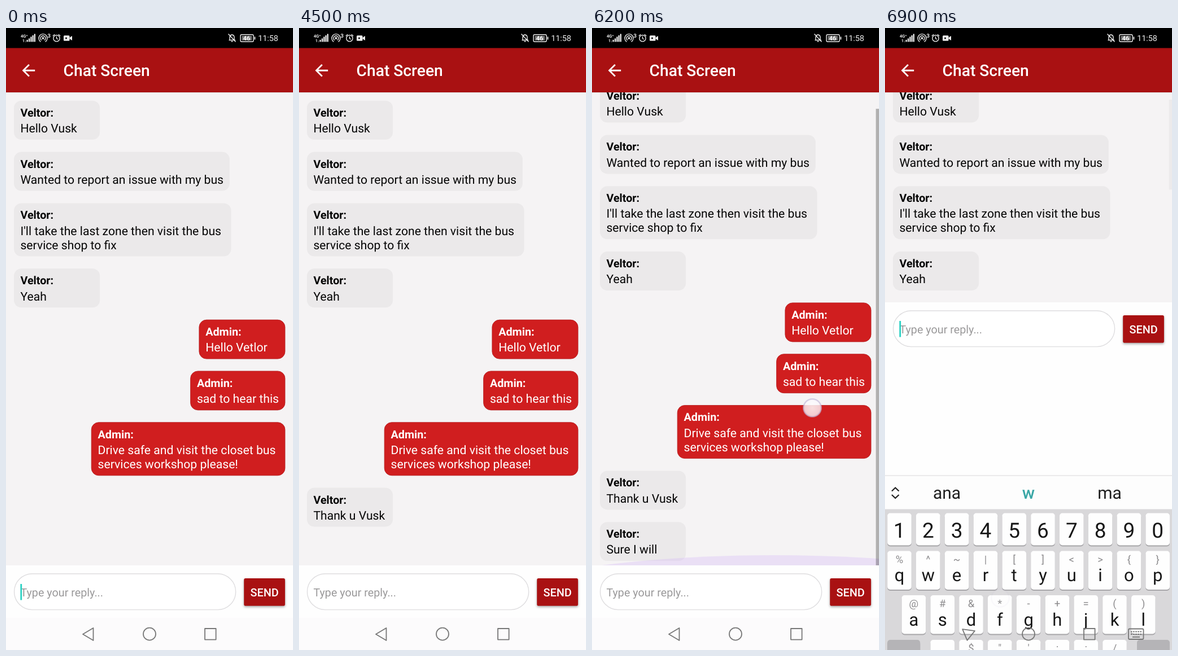
Write an HTML page that moves like this. It is 508 px wide and 1102 px high and loops after 7 s.

```html
<!DOCTYPE html>
<html lang="en">
<head>
<meta charset="utf-8">
<title>Chat</title>
<style>
html, body { margin: 0; width: 100%; height: 100%; overflow: hidden; background: #f5f3f4; }
svg { display: block; width: 100%; height: 100%; font-family: Roboto, "Noto Sans", sans-serif; text-rendering: geometricPrecision; }
</style>
</head>
<body>
<svg id="stage" viewBox="0 0 508 1102">
  <defs>
    <clipPath id="view"><rect id="viewRect" x="0" y="114" width="508" height="838"/></clipPath>
    <radialGradient id="dot">
      <stop offset="0" stop-color="#fff" stop-opacity=".85"/>
      <stop offset=".78" stop-color="#fbf8fc" stop-opacity=".8"/>
      <stop offset=".9" stop-color="#c3b8d8" stop-opacity=".85"/>
      <stop offset="1" stop-color="#c3b8d8" stop-opacity="0"/>
    </radialGradient>
  </defs>
  <rect width="508" height="1102" fill="#f5f3f4"/>

  <g clip-path="url(#view)">
    <g id="list"></g>
    <path id="glow" fill="#d2b0f5" fill-opacity=".3"/>
    <rect id="bar" x="502.5" width="5.5" fill="#000"/>
  </g>

  <g id="panel">
    <rect y="952" width="508" height="620" fill="#fefefe"/>
    <rect x="14.6" y="967" width="392" height="63.6" rx="31.8" fill="#fff" stroke="#dedddf" stroke-width="1.4"/>
    <text x="25.4" y="1006.7" font-size="19.76" fill="#9a999a">Type your reply...</text>
    <rect id="cursor" x="25.4" y="985" width="2.8" height="28.5" fill="#27d0c2"/>
    <rect x="421.2" y="975" width="72.7" height="48.7" rx="2.8" fill="#a91112" style="filter:drop-shadow(0 2px 2px rgba(0,0,0,.35))"/>
    <text x="457.6" y="1006.8" font-size="19.76" font-weight="500" fill="#fff" text-anchor="middle">SEND</text>
  </g>

  <rect id="navBack" y="1045" width="508" height="57" fill="#fcfbfc"/>
  <g id="keys"></g>

  <g fill="none" stroke="#777" stroke-width="1.8" stroke-linejoin="round">
    <path id="back" d="M136 1074L154.5 1063V1085Z"/>
    <circle cx="254" cy="1073.7" r="11"/>
    <rect x="352" y="1064" width="19.6" height="19.6"/>
    <g id="kbIcon">
      <rect x="431" y="1064.5" width="26.5" height="18.5" rx="2"/>
      <path d="M435 1069.5H454M435 1074H454" stroke-dasharray="2.6 1.5"/>
      <path d="M438 1079H451"/>
    </g>
  </g>

  <rect y="114" width="508" height="1.5" fill="#000" opacity=".06"/>
  <rect y="35" width="508" height="79" fill="#a91112"/>
  <path transform="translate(23 58.3) scale(1.411)" fill="#fff" d="M20 11H7.83l5.59-5.59L12 4l-8 8 8 8 1.41-1.41L7.83 13H20z"/>
  <text x="101.6" y="85.3" font-size="28.2" font-weight="500" fill="#fff">Chat Screen</text>

  <rect width="508" height="35.5" fill="#000"/>
  <g fill="#eee" font-weight="700">
    <text x="26" y="16.5" font-size="7.5">4G⁺</text>
    <text x="29" y="24.5" font-size="7">1↓</text>
    <path d="M36.500 21h2.300v3.500h-2.300zM40 18.500h2.300v6H40zM43.300 15.500h2.300v9h-2.300zM46.500 13h2.300v11.500h-2.300zM49.700 10.500H52v14h-2.300z"/>
    <text x="73.500" y="17" font-size="9.500">3</text>
    <circle cx="65.500" cy="18" r="1.900"/>
    <rect x="102" y="13.200" width="10.500" height="9.600" rx="1.500"/>
    <path d="M112.500 17l4.500-3v8l-4.500-3z"/>
    <circle cx="106.500" cy="18" r="1.500" fill="#000"/>
    <rect x="417.500" y="14" width="17.500" height="8" fill="#777"/>
    <text x="426" y="21.800" font-size="11" text-anchor="middle" fill="#fff">46</text>
    <rect x="439.500" y="15.500" width="1.800" height="5"/>
  </g>
  <g fill="none" stroke="#eee" stroke-width="1.4">
    <path d="M61.500 24.500A7.500 7.500 0 1 1 69.500 24.500M63 21.700A4.400 4.400 0 1 1 68 21.700"/>
    <circle cx="89.500" cy="18.300" r="5.600"/>
    <path d="M89.500 15v3.500l2.500 1.500M82.800 14.200l3.500-3M96.200 14.200l-3.500-3"/>
    <path d="M394.500 21.500h11.500M396 21.500V16.500Q396 12.500 400 12Q404 12.500 404 16.500V21.500M398.500 23.700h3M393.500 10.500L406.500 24.500"/>
    <rect x="415" y="11.800" width="23" height="12.400" rx="2"/>
  </g>
  <text x="446.300" y="23.200" font-size="14.300" fill="#eee">11:58</text>

  <circle id="touch" r="17.500" fill="url(#dot)"/>
</svg>
<script>
const NS = "http://www.w3.org/2000/svg";
const $ = id => document.getElementById(id);

function add(parent, tag, attrs, text) {
  const el = document.createElementNS(NS, tag);
  for (const k in attrs) el.setAttribute(k, attrs[k]);
  if (text) el.textContent = text;
  return parent.appendChild(el);
}

// Messages: sender, left edge, width, time of arrival, lines
const GUEST = "Veltor", ADMIN = "Admin";
const CHAT = [
  [GUEST, 14.1, 152, 0, "Hello Vusk"],
  [GUEST, 14.1, 381.7, 0, "Wanted to report an issue with my bus"],
  [GUEST, 14.1, 384.4, 0, "I'll take the last zone then visit the bus", "service shop to fix"],
  [GUEST, 14.1, 152, 0, "Yeah"],
  [ADMIN, 341.9, 152, 0, "Hello Vetlor"],
  [ADMIN, 326.6, 167.3, 0, "sad to hear this"],
  [ADMIN, 151.2, 342.7, 0, "Drive safe and visit the closet bus", "services workshop please!"],
  [GUEST, 14.1, 152, 1000, "Thank u Vusk"],
  [GUEST, 14.1, 152, 5000, "Sure I will"]
];

let top_ = 128.8;
const bubbles = CHAT.map(([who, x, w, at, ...lines]) => {
  const red = who === ADMIN;
  const g = add($("list"), "g", { fill: red ? "#fff" : "#050505" });
  const h = 69 + 25.1 * (lines.length - 1);
  add(g, "rect", {
    x, y: top_, width: w, height: h, rx: 13,
    fill: red ? "#d01e1f" : "#ebe9ea",
    stroke: red ? "#b3191b" : "none", "stroke-width": 0.8
  });
  add(g, "text", { x: x + 11.3, y: top_ + 28, "font-size": 19.76, "font-weight": 700 }, who + ":");
  lines.forEach((line, i) =>
    add(g, "text", { x: x + 11.3, y: top_ + 56.3 + 25 * i, "font-size": 21.17 }, line));
  top_ += h + 21.8;
  return { g, at };
});

// Keyboard
const keys = $("keys");
function keyCap(x, y, w, h, fill) {
  add(keys, "rect", { x, y: y + 2, width: w, height: h, rx: 5, fill: "#a8a7aa" });
  add(keys, "rect", { x, y, width: w, height: h, rx: 5, fill });
}
function label(s, x, y, size, fill, weight = 400) {
  add(keys, "text", { x, y, "font-size": size, fill, "font-weight": weight, "text-anchor": "middle" }, s);
}
function row(letters, hints, x0, y) {
  [...letters].forEach((ch, i) => {
    const x = x0 + 50.8 * i, mid = x + 21.3;
    keyCap(x, y, 42.6, hints ? 68.5 : 57, "#fefefe");
    if (hints) label(hints[i], mid, y + 21, 18.5, "#8d8c8e");
    label(ch, mid, y + (hints ? 53.5 : 43.5), hints ? 31 : 37, "#171717");
  });
}
add(keys, "rect", { y: 792.5, width: 508, height: 310, fill: "#d9d8da" });
add(keys, "rect", { y: 793.5, width: 508, height: 59, fill: "#fdfdfd" });
add(keys, "path", { d: "M12 820.500l6.300-6 6.300 6M12 827l6.300 6 6.300-6", fill: "none", stroke: "#222", "stroke-width": 2.2 });
label("ana", 109.5, 834, 30, "#202020");
label("w", 254, 834, 30, "#3ba7a6", 500);
label("ma", 397.500, 834, 30, "#202020");
row("1234567890", "", 4.2, 859.5);
row("qwertyuiop", "%^~|[]<>{}", 4.2, 926.5);
row("asdfghjkl", "@#&*-+=()", 29.6, 1005);
row("zxcvbnm", "_$\"':;/", 80.4, 1084);
keyCap(4.2, 1084, 58, 68, "#b5b4b7");
keyCap(446, 1084, 58, 68, "#b5b4b7");

// Tables of steps
const BLINK = [[0, 1], [400, 0], [1000, 1], [1400, 0], [2000, 1], [2400, 0], [3000, 1],
  [3400, 0], [4000, 1], [4500, 0], [5000, 1], [5500, 0], [6800, 1]];
const SCROLL = [[0, 0], [6100, 15.5], [6200, 30.2]];
const BAR = [[0, 0], [6100, 0.28], [6700, 0.2], [6800, 0.1], [6900, 0.035]];
// glow: height scale, centre x
const GLOW = [[0, 0, 322], [6200, 0.22, 322], [6300, 0.42, 345], [6400, 0.477, 355],
  [6500, 0.36, 355], [6600, 0.2, 355], [6700, 0.08, 355], [6800, 0, 355]];
// touch: opacity, x, y
const TOUCH = [[0, 0, 0, 0], [5600, 1, 388, 693], [5700, 0.8, 388, 693], [5800, 0.35, 388, 693],
  [5900, 0, 388, 693], [6100, 1, 332, 781], [6200, 1, 390, 673], [6300, 1, 449, 565],
  [6400, 0.3, 449, 565], [6500, 0, 449, 565], [6700, 1, 204, 1010], [6800, 0.6, 204, 1010],
  [6900, 0.12, 204, 1010]];

const at = (table, t) => table.reduce((a, s) => (s[0] <= t ? s : a)).slice(1);
const set = (id, name, v) => $(id).setAttribute(name, v);
const show = (id, on) => set(id, "visibility", on ? "visible" : "hidden");

function draw(t) {
  const open = t >= 6900;
  const bottom = open ? 486 : 952;
  const view = bottom - 114, full = 868.2;
  const [scroll] = at(SCROLL, t);

  for (const b of bubbles) b.g.setAttribute("visibility", t >= b.at ? "visible" : "hidden");
  set("list", "transform", `translate(0 ${-scroll})`);
  set("viewRect", "height", view);
  set("bar", "y", 114 + scroll / full * view);
  set("bar", "height", view * view / full);
  set("bar", "opacity", at(BAR, t)[0]);

  const [k, cx] = at(GLOW, t);
  set("glow", "d", k ? `M${cx - 305} 952A610 ${610 * k} 0 0 1 ${cx + 305} 952Z` : "");

  set("panel", "transform", `translate(0 ${bottom - 952})`);
  set("cursor", "opacity", at(BLINK, t)[0]);
  show("keys", open);
  show("navBack", !open);
  set("back", "transform", `rotate(${open ? -82 : t >= 6800 ? -25 : 0} 147 1074)`);
  set("kbIcon", "opacity", open ? 1 : t >= 6800 ? 0.25 : 0);

  const [o, x, y] = at(TOUCH, t);
  set("touch", "opacity", o);
  set("touch", "transform", `translate(${x} ${y})`);
}

const start = performance.now();
function tick() {
  const t = Math.max(0, performance.now() - start) % 7000;
  draw(Math.floor(t / 100) * 100);
  requestAnimationFrame(tick);
}
draw(0);
requestAnimationFrame(tick);
</script>
</body>
</html>
```
